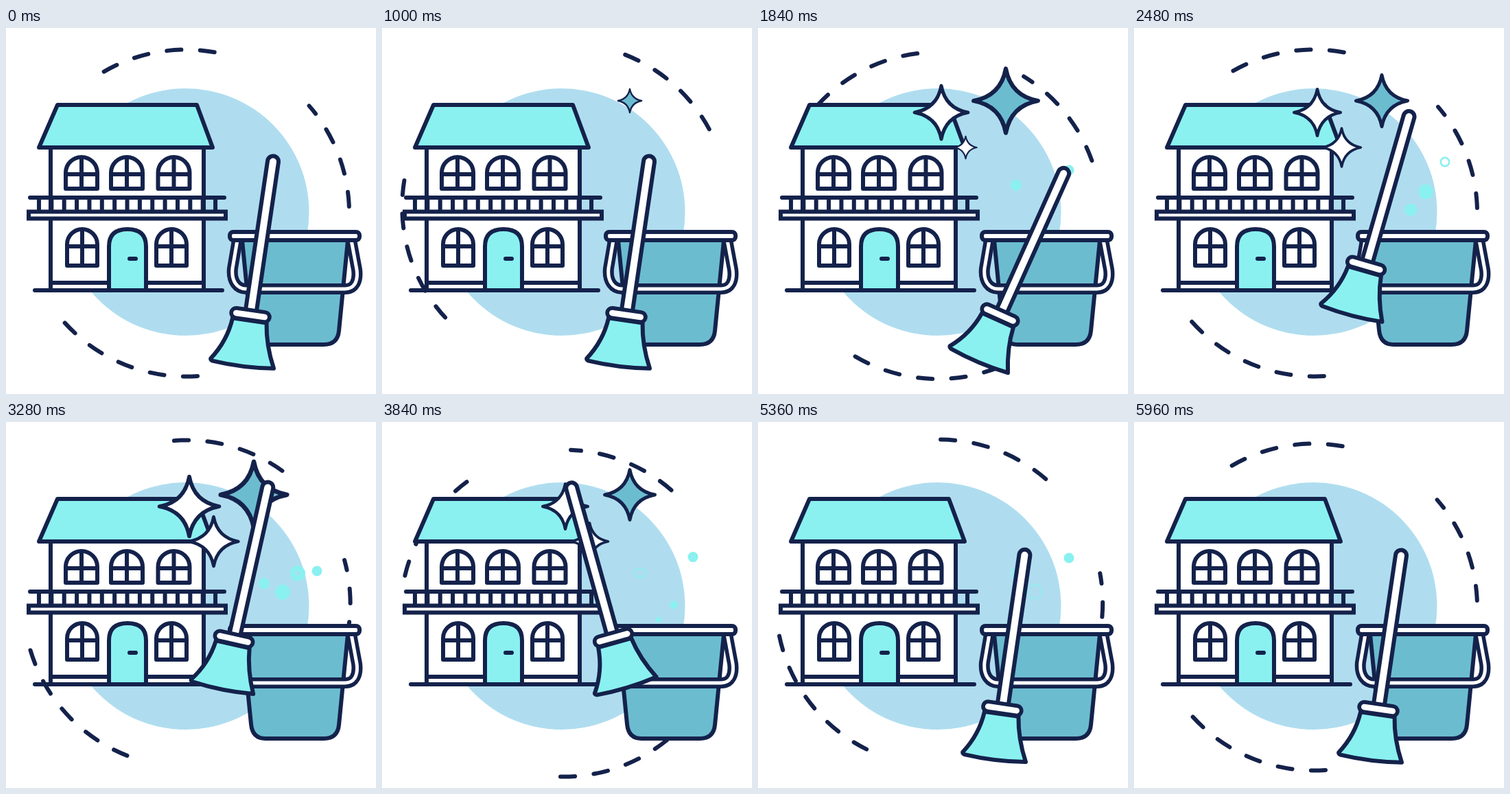
Recreate the animation shown at these times as an HTML page. Size 539 by 533 pixels, loop 6000 ms.

```html
<!DOCTYPE html>
<html lang="en">
<head>
<meta charset="utf-8">
<title>House cleaning</title>
<style>
  html, body { margin: 0; width: 100%; height: 100%; overflow: hidden; background: #fff; }
  svg { display: block; width: 100%; height: 100%; }
  .line { fill: none; stroke: #14224b; stroke-width: 6; stroke-linecap: round; stroke-linejoin: round; }
  .white { fill: #fff; }
  .aqua { fill: #8af1f0; }
  .teal { fill: #6cbcd0; }
  .core { stroke: #fff; }
  .bubble { fill: none; stroke: #8af1f0; }
</style>
</head>
<body>
<svg viewBox="0 0 539 533">
  <circle cx="261.5" cy="268" r="180" fill="#afddef"/>
  <g id="ring" class="line"></g>

  <g id="house" class="line">
    <path class="white" d="M65 174H288V382H65Z"/>
    <path d="M65 371H288M42 382H315"/>
    <path class="aqua" d="M75 112H278L301 174H48Z"/>
    <path class="aqua" d="M150 382V318Q150 293 177 293Q204 293 204 318V382Z"/>
    <path d="M180 336H189"/>
    <g id="windows"></g>
    <path id="rail"/>
    <path class="white" d="M33 267.5H320V277.5H33Z" stroke-linejoin="miter"/>
  </g>

  <g id="bubbles"></g>

  <g id="bucket" class="line">
    <path class="teal" d="M344 309L357 440Q359 461 378 461H463Q483 461 485 441L498 309Z"/>
    <g id="strap"></g>
    <rect class="white" x="326" y="297" width="189" height="12" rx="5"/>
  </g>

  <g id="stars" class="line"></g>

  <g id="mop" class="line">
    <path class="aqua" d="M-25 8C-27 32 -36 54 -48 71Q-48 73 -45 74Q0 78 45 72C36 54 28 32 25 8Z"/>
  </g>
</svg>
<script>
const LOOP = 6000, STEP = 40, TAU = 2 * Math.PI;
const $ = id => document.getElementById(id);
const clamp = u => Math.min(1, Math.max(0, u));
const ease = u => (1 - Math.cos(Math.PI * clamp(u))) / 2;

function add(parent, tag, attrs) {
  const el = document.createElementNS('http://www.w3.org/2000/svg', tag);
  for (const key in attrs) el.setAttribute(key, attrs[key]);
  return parent.appendChild(el);
}

// Eases between poses of the form [time, ...values].
function pose(keys, t) {
  const i = keys.findIndex(k => k[0] > t);
  if (i < 0) return keys[keys.length - 1].slice(1);
  const from = keys[Math.max(0, i - 1)], to = keys[i];
  const u = ease((t - from[0]) / (to[0] - from[0]));
  return from.slice(1).map((v, j) => v + (to[j + 1] - v) * u);
}

// Hollow band: dark outline with a white core.
function band(parent, d, outer, inner) {
  add(parent, 'path', { d, style: `stroke-width:${outer}` });
  add(parent, 'path', { d, class: 'core', style: `stroke-width:${inner}` });
}

// Dashed ring, angles counterclockwise from the right
function dashes(start, count, limit = 360) {
  const at = deg => {
    const a = deg / 360 * TAU;
    return `${262 + 238 * Math.cos(a)} ${269.5 - 238 * Math.sin(a)}`;
  };
  for (let i = 0; i < count; i++) {
    const a = start + i * 11.7;
    add($('ring'), 'path', { d: `M${at(a)}A238 238 0 0 0 ${at(Math.min(a + 5.1, limit))}` });
  }
}
dashes(79.9, 4);
dashes(2.3, 4, 41);
dashes(222.2, 5);

// House details
function pane(x, top, half, height, mid) {
  const l = x - half, r = x + half, b = top + height;
  add($('windows'), 'path', {
    class: 'white',
    d: `M${l} ${b}V${top + half}A${half} ${half} 0 0 1 ${r} ${top + half}V${b}ZM${x} ${top}V${b}M${l} ${mid}H${r}`
  });
}
[110, 176, 244.5].forEach(x => pane(x, 188, 23, 46, 213));
[111, 241].forEach(x => pane(x, 293, 22, 53, 318));

let rail = 'M35 247H318';
for (let i = 0; i < 15; i++) rail += `M${48 + i * 18.36} 247V267`;
$('rail').setAttribute('d', rail);

band($('strap'), 'M337 309L330 350C328 369 337 380 350 380H494C508 380 513 368 511 352L503 309', 16, 5);
band($('mop'), 'M0 -226V-8', 22, 10);
band($('mop'), 'M-21 0H21', 20, 8.5);

// Stars pop in, pulse together and shrink away.
const stars = [
  { x: 361, y: 106, fill: 'teal', size: 44.5, from: 832, to: 4490 },
  { x: 302.5, y: 174, fill: 'white', size: 33, from: 1648, to: 4290 },
  { x: 267, y: 123, fill: 'white', size: 40, from: 1512, to: 4390 }
];
for (const s of stars) {
  s.el = add($('stars'), 'path', {
    class: s.fill, d: 'M0 -45Q7 -7 45 0Q7 7 0 45Q-7 7 -45 0Q-7 -7 0 -45Z'
  });
}

function drawStar(s, t) {
  const pulse = 1 + 0.147 * Math.cos((t - 3200) / 1200 * TAU);
  const size = s.size * pulse * ease((t - s.from) / 400) * (1 - ease((t - s.to) / 800));
  s.el.style.display = size > 0.5 ? '' : 'none';
  s.el.setAttribute('transform', `translate(${s.x} ${s.y}) scale(${size / 47})`);
}

// Each column sends up one bubble after another; each slows down and pops into a thinning ring.
const bubbles = [
  { x: 376, r: 8, from: 1271, life: 1100, rest: 440, rise: 80 },
  { x: 403, r: 11, from: 1946, life: 1750, rest: 0, rise: 53 },
  { x: 425, r: 11, from: 1800, life: 1750, rest: 0, rise: 80 },
  { x: 453, r: 7.5, from: 1010, life: 1615, rest: 0, rise: 105 }
];
for (const b of bubbles) b.el = add($('bubbles'), 'circle', { class: 'bubble', cx: b.x });

function drawBubble(b, t) {
  const period = b.life + b.rest;
  const start = b.from + Math.floor((t - b.from) / period) * period;
  const u = (t - start) / b.life;
  const solid = clamp((0.97 - u) / 0.17);
  const shown = start >= b.from && start < 5000 && solid > 0;
  b.el.style.display = shown ? '' : 'none';
  if (!shown) return;
  const r = b.r * Math.min(1, 0.2 + 2 * u), width = r * solid;
  b.el.setAttribute('cy', 300 - b.rise * (1 - (1 - u) ** 3));
  b.el.setAttribute('r', r - width / 2);
  b.el.setAttribute('stroke-width', width);
}

// Turning points of the ring's swing
const swing = [[0, 0], [1120, 53], [1940, -20], [3160, 30], [3960, -51], [5020, 43], [5960, 0]];

// Mop: time, x, y, tilt
const rest = [356, 418, 8.4], lean = [352.5, 418, 24.2], lift = [332, 316, 12.6];
const sweep = [
  [1280, ...rest], [1840, ...lean], [2100, ...lean], [2700, ...lift], [3280, ...lift],
  [3840, 337, 314, -15.6], [4600, 337, 313, -11.2], [5400, ...rest]
];

function draw(t) {
  const [x, y, tilt] = pose(sweep, t);
  $('ring').setAttribute('transform', `rotate(${pose(swing, t)} 274 270.5)`);
  $('mop').setAttribute('transform', `translate(${x} ${y}) rotate(${tilt})`);
  stars.forEach(s => drawStar(s, t));
  bubbles.forEach(b => drawBubble(b, t));
}

const begin = performance.now();
function tick() {
  const t = (performance.now() - begin) % LOOP;
  draw(Math.floor(t / STEP) * STEP);
  requestAnimationFrame(tick);
}
tick();
</script>
</body>
</html>
```
